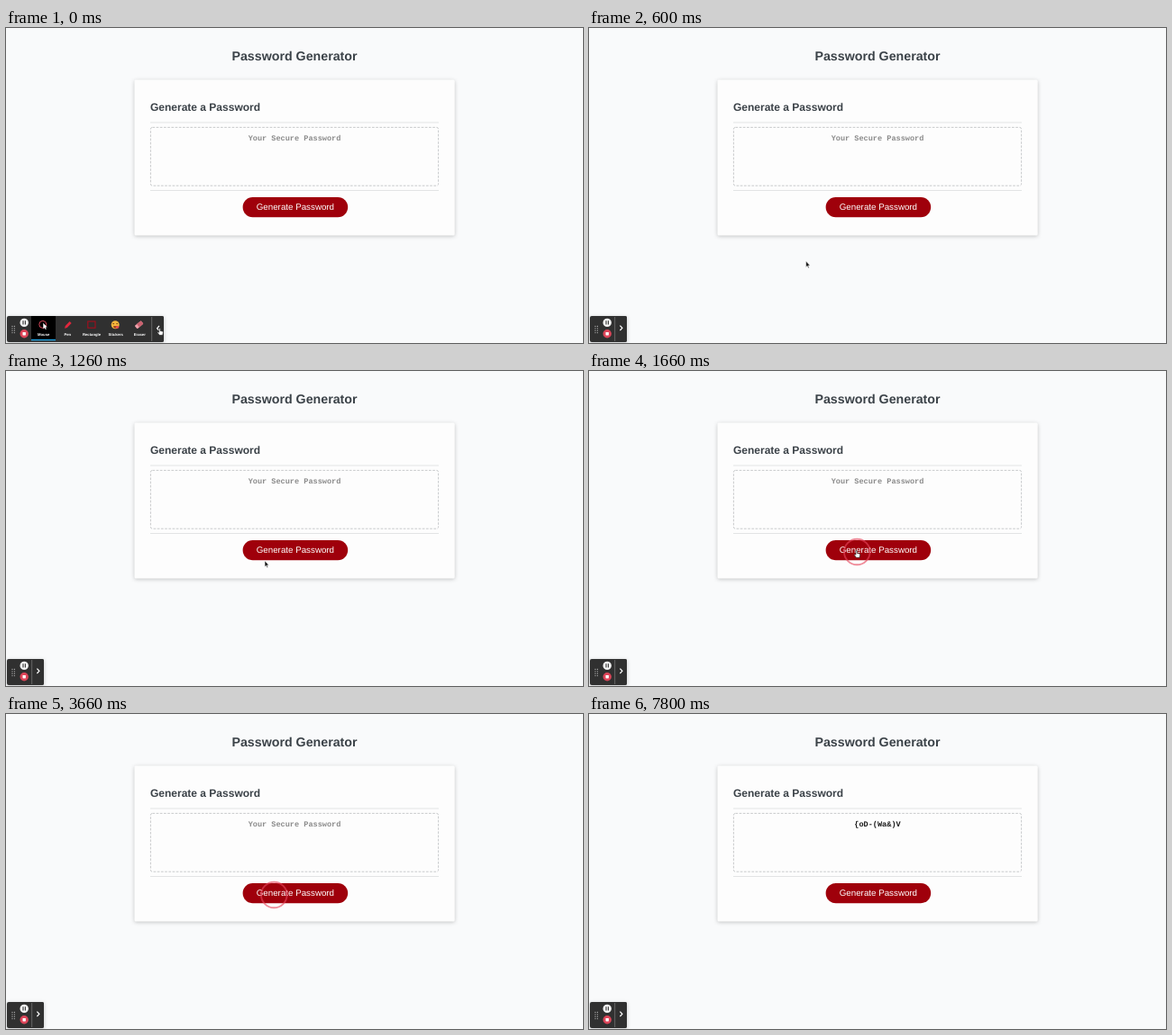
Write an HTML page that moves like this. It is 640 by 350 pixels and loops after 8 s.

```html
<!DOCTYPE html>
<html lang="en">
<head>
<meta charset="utf-8">
<title>Password Generator</title>
<style>
  html, body { margin: 0; width: 100%; height: 100%; overflow: hidden; background: #f9fafb; }
  svg { display: block; width: 100%; height: 100%; }
  text { font-family: "Liberation Sans", Arial, sans-serif; text-rendering: geometricPrecision; }
  .heading { font-weight: bold; fill: #3b4248; }
  .mono { font: bold 8.56px "Liberation Mono", "Courier New", monospace; text-anchor: middle; }
  .label { font-size: 4.2px; font-weight: bold; fill: #fff; text-anchor: middle; }
  .card { filter: drop-shadow(0 1px 2px rgba(0, 0, 0, .22)); }
</style>
</head>
<body>
<svg viewBox="0 0 640 350">
  <defs>
    <clipPath id="barClip"><rect id="clipRect" x="1" y="320" height="29" rx="2"/></clipPath>
  </defs>

  <text class="heading" x="320" y="36" font-size="14.22" text-anchor="middle">Password Generator</text>
  <rect class="card" x="142.5" y="57.5" width="355.2" height="173" rx="1.5" fill="#fdfdfd"/>
  <text class="heading" x="160" y="91.8" font-size="12">Generate a Password</text>
  <path d="M160 105H480M160 180.5H480" stroke="#dfe1e3" stroke-width=".9"/>
  <rect x="160.4" y="110.4" width="319.2" height="64.8" rx="2" fill="none"
        stroke="#c6c8ca" stroke-width=".95" stroke-dasharray="2.7 1.5"/>
  <text id="output" class="mono" x="320" y="125.3"></text>
  <rect x="262.6" y="188" width="116.6" height="22.2" rx="11.1" fill="#9f000b"/>
  <text x="320.9" y="202.4" font-size="9.78" fill="#fff" text-anchor="middle">Generate Password</text>

  <g class="card">
    <g clip-path="url(#barClip)">
      <rect x="1" y="320" width="175" height="29" fill="#303030"/>
      <g id="tools">
        <rect x="28" y="320" width="27" height="27" fill="#000"/>
        <rect x="28" y="345.8" width="27" height="1.5" fill="#1d9bd8"/>
        <circle cx="40.8" cy="329.4" r="4" fill="none" stroke="#d9475a"/>
        <path d="M41.3 327.8v6.4l1.5-1.3 1 2 1-.5-1-1.9h1.9z" fill="#fff"/>
        <path d="M65 333.8l.8-2.8 4.8-5 2 1.9-4.8 5z" fill="#e0263c"/>
        <rect x="90.8" y="326" width="8.2" height="7.2" fill="none" stroke="#a50d1c" stroke-width="1.1"/>
        <circle cx="121.2" cy="329.8" r="4.5" fill="#f6b73c"/>
        <path d="M118.3 328.6h1.8M122.3 328.6h1.8" stroke="#6b3a14" stroke-width=".9"/>
        <path d="M119 331.2h4.4a2.2 2.2 0 0 1-4.4 0z" fill="#8a2c1c"/>
        <circle cx="123.5" cy="332.3" r="1.6" fill="#e5484d"/>
        <g transform="rotate(-40 147.5 329.7)">
          <rect x="143" y="327.6" width="9" height="4.4" rx=".7" fill="#f0a0ab"/>
          <rect x="146" y="327.6" width="6" height="4.4" rx=".7" fill="#c9626f"/>
        </g>
      </g>
      <rect id="endCap" y="320" width="14" height="29" fill="#303030"/>
      <path id="divider" d="M0 321V348" stroke="#777" stroke-width=".8"/>
      <path id="chevron" fill="none" stroke="#fff" stroke-width="1.2"/>
      <g id="dots" fill="#bbb"></g>
      <circle cx="20.2" cy="327.4" r="4.7" fill="#f4f4f4"/>
      <path d="M19 325.3v4.2M21.4 325.3v4.2" stroke="#333" stroke-width="1.1"/>
      <circle cx="20.2" cy="339.7" r="4.7" fill="#dc4458"/>
      <rect x="18.5" y="338" width="3.4" height="3.4" rx=".4" fill="#fff"/>
    </g>
  </g>

  <circle id="ring" cx="297.3" cy="201" r="14.3" fill="none" stroke="#e6455c" stroke-width="1.9"/>
  <path id="arrow" d="M0-2.4V4.2L1.5 2.9 2.5 5.2 3.5 4.8 2.5 2.5H4.5Z"
        fill="#111" stroke="#fff" stroke-width=".5"/>
  <path id="hand" d="M-1.3-3.6Q-.5-4.4 .2-3.6V-1L2.6-.5Q3.5-.2 3.4 .7L2.8 3.8H-.9L-3 .9Q-2.9-.1-1.9 .3L-1.3 .8Z"
        fill="#fff" stroke="#222" stroke-width=".65"/>
</svg>
<script>
const LOOP = 8000;
const $ = id => document.getElementById(id);
const set = (id, attrs) => {
  for (const name in attrs) $(id).setAttribute(name, attrs[name]);
};
const add = (parent, tag, attrs) => {
  const node = document.createElementNS("http://www.w3.org/2000/svg", tag);
  for (const name in attrs) node.setAttribute(name, attrs[name]);
  parent.append(node);
  return node;
};
const progress = (t, from, to) => Math.min(1, Math.max(0, (t - from) / (to - from)));
const smooth = p => p * p * (3 - 2 * p);

["Mouse", "Pen", "Rectangle", "Stickers", "Eraser"].forEach((name, i) => {
  add($("tools"), "text", { class: "label", x: 41.7 + i * 26.65, y: 341.5 }).textContent = name;
});
for (let i = 0; i < 8; i++) {
  add($("dots"), "circle", { cx: 7 + (i % 2) * 2.4, cy: 331.4 + (i >> 1) * 2.4, r: .6 });
}

// Pointer stops: time, x, y
const stops = [[240, 171, 337.5], [800, 269, 230.5], [960, 269, 230.5], [1000, 271.7, 228], [1460, 297.3, 203.5]];

function pointerAt(t) {
  if (t <= stops[0][0]) return stops[0].slice(1);
  for (let i = 1; i < stops.length; i++) {
    const [t0, x0, y0] = stops[i - 1], [t1, x1, y1] = stops[i];
    if (t < t1) {
      const p = smooth(progress(t, t0, t1));
      return [x0 + (x1 - x0) * p, y0 + (y1 - y0) * p];
    }
  }
  return stops.at(-1).slice(1);
}

function drawToolbar(t) {
  const p = smooth(progress(t, 60, 200));
  const right = 175 - 133 * p;
  const tip = right - 6;
  set("clipRect", { width: right - 1 });
  set("endCap", { x: right - 13.3 });
  set("divider", { transform: `translate(${right - 13.3})` });
  set("chevron", {
    d: p < 1 ? `M${tip + 1} 331l-2.4 2.7 2.4 2.7` : `M${tip - 1.6} 330.6l2.5 2.7-2.5 2.7`
  });
  $("tools").style.display = p < 1 ? "" : "none";
}

function drawPointer(t) {
  const [x, y] = pointerAt(t);
  const isHand = t < 260 || (x > 262 && y < 210);
  const visible = t < 3400;
  for (const [id, on] of [["hand", isHand], ["arrow", !isHand]]) {
    set(id, { transform: `translate(${x} ${y})`, visibility: visible && on ? "visible" : "hidden" });
  }
}

function draw(t) {
  const done = t >= 7730;
  drawToolbar(t);
  drawPointer(t);
  set("ring", { opacity: t < 1660 ? 0 : .62 * (1 - progress(t, 6800, 7000)) });
  $("output").textContent = done ? "{oD-(Wa&)V" : "Your Secure Password";
  set("output", { fill: done ? "#1c1c1c" : "#8b8b8b" });
}

const start = performance.now();
function frame() {
  draw((performance.now() - start) % LOOP);
  requestAnimationFrame(frame);
}
frame();
</script>
</body>
</html>
```
